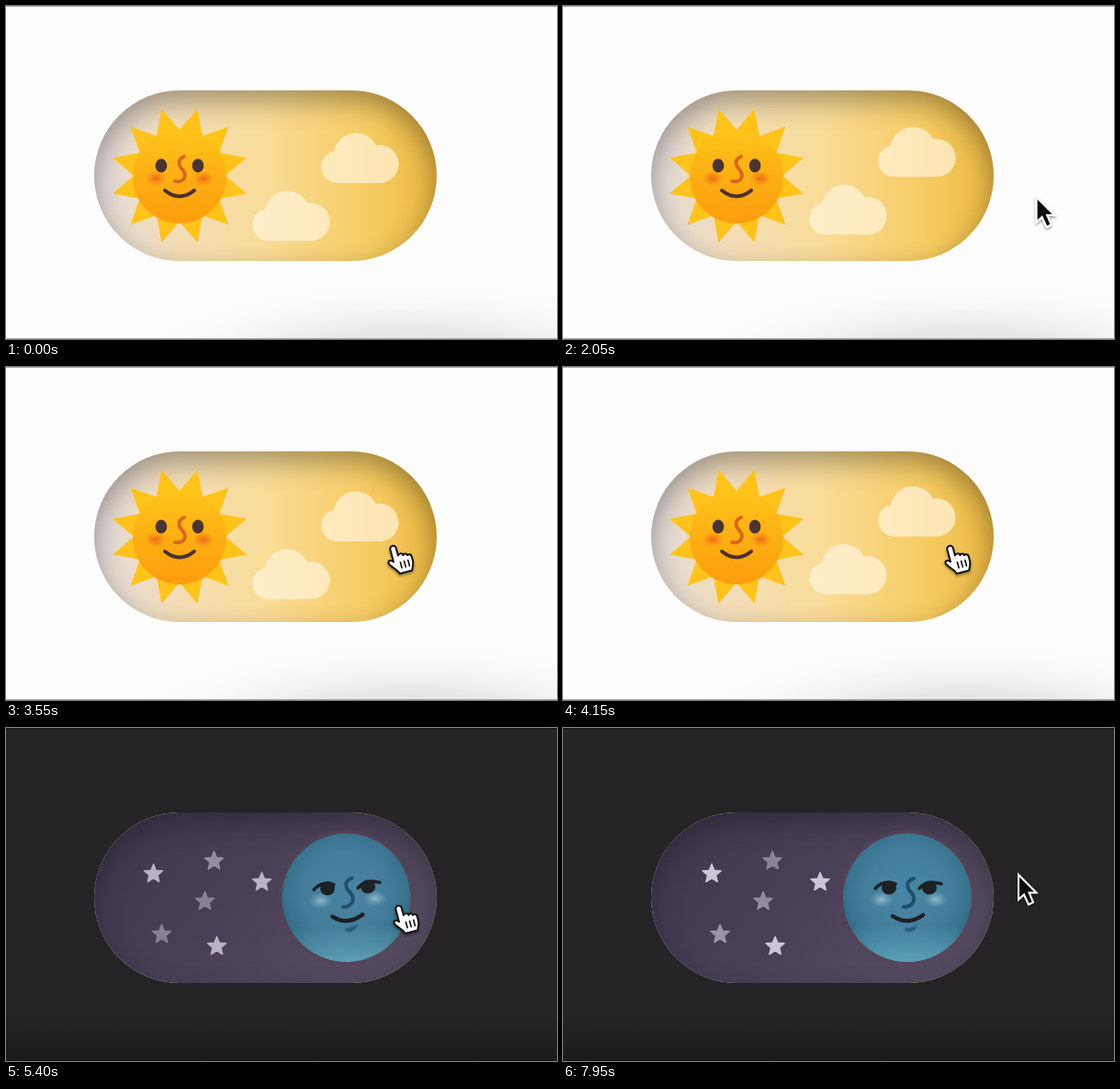
An HTML page for the animation above (8 s loop, 600 by 363 pixels).

```html
<!DOCTYPE html>
<html lang="en">
<head>
<meta charset="utf-8">
<title>Day and night toggle</title>
<style>
html, body { margin: 0; width: 100%; height: 100%; overflow: hidden; background: #252325; }
svg { display: block; width: 100%; height: 100%; }
</style>
</head>
<body>
<svg viewBox="0 0 600 363" preserveAspectRatio="none">
  <defs>
    <clipPath id="pill"><rect x="96" y="92" width="373" height="186" rx="93"/></clipPath>
    <linearGradient id="day">
      <stop offset="0" stop-color="#e3dcdd"/>
      <stop offset=".2" stop-color="#f1ddbd"/>
      <stop offset=".5" stop-color="#f9dc97"/>
      <stop offset=".8" stop-color="#f6cc62"/>
      <stop offset="1" stop-color="#ebb842"/>
    </linearGradient>
    <linearGradient id="night" x2="1" y2=".4">
      <stop offset="0" stop-color="#3f374d"/>
      <stop offset=".5" stop-color="#483f57"/>
      <stop offset="1" stop-color="#554b61"/>
    </linearGradient>
    <radialGradient id="floor">
      <stop offset="0" stop-color="#dcdadb"/>
      <stop offset=".4" stop-color="#e8e6e7"/>
      <stop offset="1" stop-color="#fefdfe" stop-opacity="0"/>
    </radialGradient>
    <linearGradient id="dusk" x2="0" y2="1">
      <stop offset="0" stop-color="#1c1a1c" stop-opacity="0"/>
      <stop offset="1" stop-color="#1c1a1c"/>
    </linearGradient>
    <radialGradient id="rays" gradientUnits="userSpaceOnUse" r="75">
      <stop offset=".66" stop-color="#f99b10"/>
      <stop offset="1" stop-color="#ffc31a"/>
    </radialGradient>
    <linearGradient id="disc" x2="0" y2="1">
      <stop offset="0" stop-color="#fdc419"/>
      <stop offset=".45" stop-color="#fdb113"/>
      <stop offset="1" stop-color="#fd9c0d"/>
    </linearGradient>
    <radialGradient id="blush">
      <stop offset="0" stop-color="#f06a1c"/>
      <stop offset="1" stop-color="#f47c14" stop-opacity="0"/>
    </radialGradient>
    <radialGradient id="orb" cy=".46" r=".54">
      <stop offset="0" stop-color="#4886a3"/>
      <stop offset=".6" stop-color="#437f9b"/>
      <stop offset=".86" stop-color="#397590"/>
      <stop offset="1" stop-color="#2f6780"/>
    </radialGradient>
    <linearGradient id="rim" x2="0" y2="1">
      <stop offset=".72" stop-color="#6db4c9" stop-opacity="0"/>
      <stop offset="1" stop-color="#6db4c9" stop-opacity=".75"/>
    </linearGradient>
    <radialGradient id="pale">
      <stop offset="0" stop-color="#9cc6d4" stop-opacity=".85"/>
      <stop offset="1" stop-color="#7fb0c4" stop-opacity="0"/>
    </radialGradient>
    <filter id="soft" x="-30%" y="-30%" width="160%" height="160%"><feGaussianBlur stdDeviation="15"/></filter>
    <filter id="drop" x="-50%" y="-50%" width="200%" height="200%"><feDropShadow dx="0" dy="2" stdDeviation="1.4" flood-opacity=".4"/></filter>
    <path id="cloud" d="M18 58A17.5 17.5 0 0 1 16 23.500A24.500 24.500 0 0 1 62 17A20.700 20.700 0 1 1 67 58Z"/>
  </defs>

  <rect width="600" height="363" fill="#fefdfe"/>
  <ellipse cx="440" cy="395" rx="330" ry="100" fill="url(#floor)"/>
  <path d="M0 .5H600M0 362.500H600" stroke="#aaa8aa"/>
  <g id="dark">
    <rect width="600" height="363" fill="#252325"/>
    <rect y="315" width="600" height="48" fill="url(#dusk)"/>
    <path d="M0 .5H600M0 362.500H600" stroke="#161516"/>
  </g>

  <g clip-path="url(#pill)">
    <rect x="96" y="92" width="373" height="186" fill="url(#day)"/>
    <rect id="sky" x="96" y="92" width="373" height="186" fill="url(#night)"/>
    <path d="M20 20H545V350H20ZM189 104H376A93 93 0 0 1 376 290H189A93 93 0 0 1 189 104Z" fill-rule="evenodd" filter="url(#soft)" id="inset"/>
    <g id="clouds" fill="#fff4dc">
      <use href="#cloud" x="341" y="135"/>
      <use href="#cloud" x="266" y="198"/>
    </g>
    <g id="stars" fill="#dcd7e6" stroke="#dcd7e6" stroke-width="1.500" stroke-linejoin="round"></g>
    <g id="comet">
      <path d="M-10-1L-26-16-21-17-24-23-11-21 1-9Z" fill="#6db2ec"/>
      <path d="M-8-5L-20-17-11-16-3-8Z" fill="#a5d5f8"/>
      <path d="M-9-9L0-5 9-9 5 0 9 9 0 5-9 9-5 0Z" fill="#f9cb45" stroke="#f9cb45" stroke-width="2" stroke-linejoin="round"/>
      <path d="M-3-3L3-2 0 1 1 4-2 2Z" fill="#d99a24"/>
    </g>
  </g>

  <g id="sun">
    <path id="spikes" fill="url(#rays)"/>
    <circle cx="0" cy="1" r="51" fill="url(#disc)"/>
    <ellipse cx="-26" cy="3" rx="12" ry="8.500" fill="url(#blush)"/>
    <ellipse cx="26" cy="3" rx="12" ry="8.500" fill="url(#blush)"/>
    <g fill="#4a3433"><ellipse cx="-20" cy="-11" rx="6.300" ry="7.500"/><ellipse cx="20" cy="-11" rx="6.300" ry="7.500"/></g>
    <g fill="none" stroke-linecap="round">
      <path d="M5-21C-2-18-2-12 3-7C9 0 5 8-5 6" stroke="#d9651c" stroke-width="3.800"/>
      <path d="M-16 16Q0 29 16 16" stroke="#4a3032" stroke-width="4"/>
    </g>
  </g>

  <g id="moon">
    <circle r="74" fill="#5a4254" opacity=".55"/>
    <circle r="70" fill="url(#orb)"/>
    <circle r="70" fill="url(#rim)"/>
    <ellipse cx="-28" cy="2" rx="13" ry="9" fill="url(#pale)"/>
    <ellipse cx="31" cy="2" rx="13" ry="9" fill="url(#pale)"/>
    <g fill="#1c2023"><ellipse cx="-20" cy="-11" rx="8" ry="7.500"/><ellipse cx="24" cy="-11" rx="8" ry="7.500"/></g>
    <g fill="none" stroke-linecap="round" stroke="#1c2023" stroke-width="3.500">
      <path d="M-35-10Q-26-20-13-15"/>
      <path d="M13-10Q21-20 37-15"/>
      <path d="M-16 20Q0 31 17 19" stroke-width="4.500"/>
      <path d="M7-21C-2-18-1-11 4-6C10 1 7 10-4 10" stroke="#1f5069" stroke-width="4"/>
    </g>
    <path d="M-4 34Q4 33 11 30Q8 39-1 37Z" fill="#28607a"/>
  </g>

  <g id="cursor" filter="url(#drop)">
    <g id="hand" transform="rotate(-15) scale(1.080)" stroke="#111" stroke-width="1.800" stroke-linejoin="round" stroke-linecap="round">
      <path fill="#fff" d="M-3 2A3 3 0 0 1 3 2V10C4 8 8 8 8 11C9 9 12 10 12 12C14 11 16 12 16 14V19C16 23 14 24 13 28H0C-1 24-6 20-8 16C-9 13-6 11-3 15Z"/>
      <path fill="none" stroke-width="1.500" d="M3.500 17V23M7.500 17V23M11.500 17V23"/>
    </g>
    <path id="arrow" d="M0 1V28L6 22.500 11 33.500 16 31 11.500 20.500H19.500Z" fill="#0c0c0c" stroke="#fff" stroke-width="2"/>
  </g>
</svg>
<script>
const LOOP = 8000, FLIP = 4220;
const el = id => document.getElementById(id);
const set = (node, attrs) => { for (const k in attrs) node.setAttribute(k, attrs[k]); };
const clamp = x => Math.min(1, Math.max(0, x));
const ease = x => { x = clamp(x); return x * x * (3 - 2 * x); };
const wave = (t, period) => Math.cos(2 * Math.PI * t / period);

// Closed star outline with alternating radii
function star(n, outer, inner, turn) {
  const pts = [];
  for (let i = 0; i < 2 * n; i++) {
    const a = turn + i * Math.PI / n, r = i % 2 ? inner : outer;
    pts.push((r * Math.sin(a)).toFixed(2) + ' ' + (-r * Math.cos(a)).toFixed(2));
  }
  return 'M' + pts.join('L') + 'Z';
}
el('spikes').setAttribute('d', star(12, 75.5, 50, Math.PI / 12));

// x, y, twinkle time offset
const stars = [[162, 159, 0], [228, 145, 1500], [280, 168, 0], [218, 189, 1200], [171, 225, 1000], [231, 238, 0]]
  .map(([x, y, lag]) => {
    const node = document.createElementNS('http://www.w3.org/2000/svg', 'path');
    set(node, { d: star(5, 10.5, 4.7, 0), transform: `translate(${x} ${y})` });
    el('stars').append(node);
    return { node, lag };
  });

// time, x, y of the pointer tip
const path = [[1300, 606, 215], [1690, 524, 212], [2550, 502, 200], [2880, 443, 178], [3000, 443, 178],
  [3400, 421, 196], [5200, 421, 196], [5900, 451, 190], [6300, 451, 190], [6800, 482, 168], [7300, 496, 159], [8000, 496, 159]];

function pointer(t) {
  if (t <= path[0][0]) return [640, 215];
  const i = path.findIndex(k => k[0] >= t), a = path[i - 1], b = path[i];
  const e = ease((t - a[0]) / (b[0] - a[0]));
  return [a[1] + (b[1] - a[1]) * e, a[2] + (b[2] - a[2]) * e];
}

function draw(t) {
  const p = ease((t - FLIP) / 1300);
  const x = 189 + 186 * p;

  set(el('dark'), { opacity: ease((t - FLIP - 20) / 490) });
  set(el('sky'), { opacity: ease((t - FLIP) / 640) });
  set(el('inset'), { opacity: 0.34 - 0.06 * p });

  const bob = -4.8 * (1 - wave(t, 3000));
  set(el('clouds'), { transform: `translate(${344 * p} ${bob})`, opacity: 0.7 * clamp(1 - 1.35 * p) });

  set(el('stars'), { transform: `translate(${-60 * (1 - p)} 0)`, opacity: clamp(2 * p - 1) });
  for (const s of stars) s.node.setAttribute('opacity', 0.68 + 0.22 * wave(t - 7950 + s.lag, 3000));

  const d = (t - 6200) * 0.2;
  set(el('comet'), { transform: `translate(${260 + d} ${257 + d})`, opacity: clamp((t - 5550) / 200) * clamp((6500 - t) / 200) });

  set(el('sun'), { transform: `translate(${x} 185) rotate(${54 * p})`, opacity: clamp(1.2 - 1.4 * p) });
  set(el('moon'), { transform: `translate(${x} 185) rotate(${-102 * (1 - p)})`, opacity: p });

  const [cx, cy] = pointer(t), over = cx < 466;
  set(el('cursor'), { transform: `translate(${cx} ${cy})` });
  set(el('hand'), { visibility: over ? 'visible' : 'hidden' });
  set(el('arrow'), { visibility: over ? 'hidden' : 'visible' });
}

const start = performance.now();
function tick() {
  draw((performance.now() - start) % LOOP);
  requestAnimationFrame(tick);
}
tick();
</script>
</body>
</html>
```
